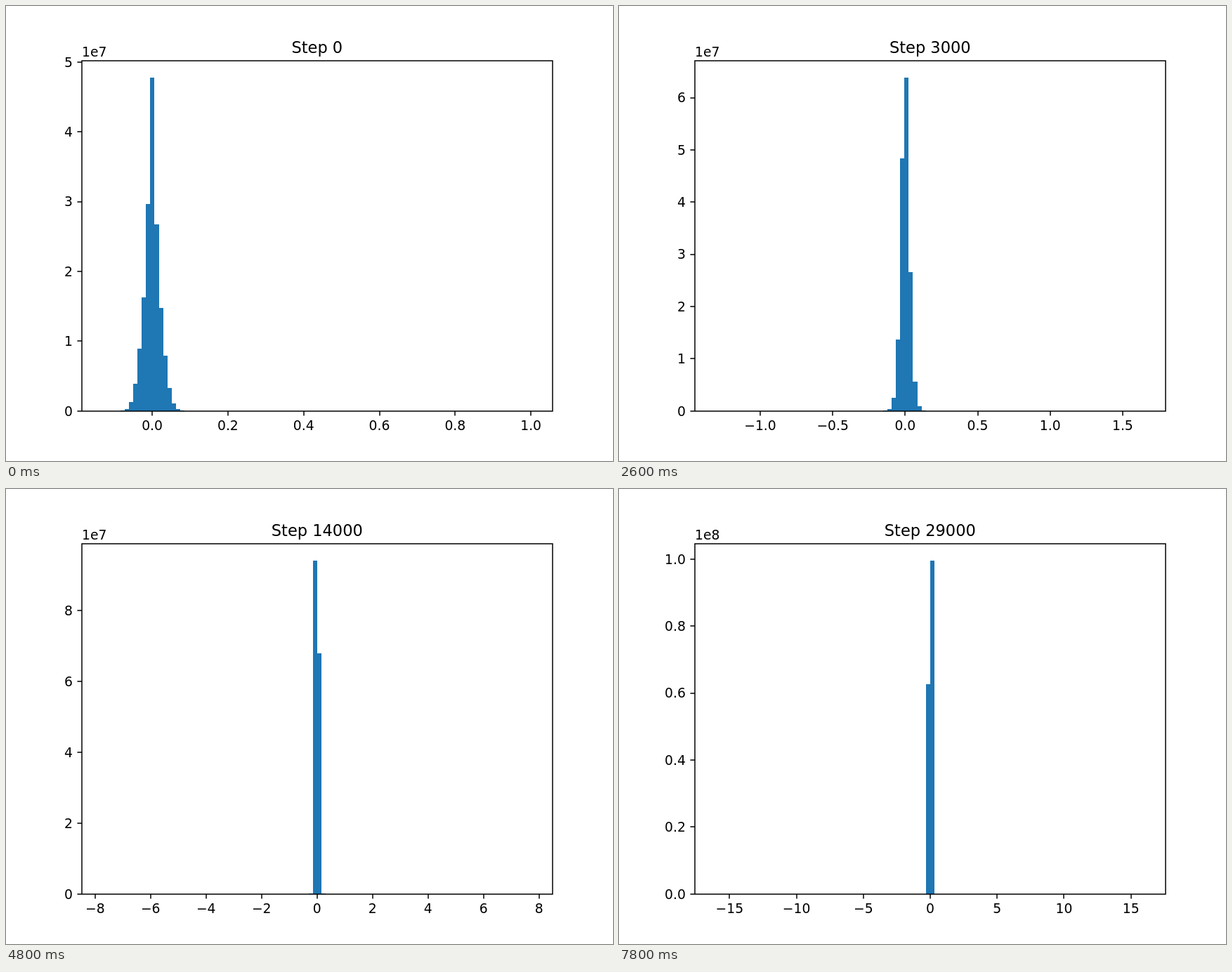
An HTML page for the animation above (8 s loop, 864x648 px).

```html
<!DOCTYPE html>
<html lang="en">
<head>
<meta charset="utf-8">
<title>Histogram by step</title>
<style>
html, body { margin: 0; width: 100%; height: 100%; overflow: hidden; background: #fff; }
svg { display: block; width: 864px; height: 648px; }
text { font: 18.75px "DejaVu Sans", sans-serif; fill: #000; }
.title { font-size: 22.5px; }
.mid { text-anchor: middle; }
.end { text-anchor: end; }
.bars { fill: #1f77b4; }
.axes { fill: none; stroke: #000; stroke-width: 1.5; }
</style>
</head>
<body>
<svg id="plot" viewBox="0 0 864 648"></svg>
<script>
const FRAME_MS = 200, FRAMES = 40, BINS = 100;
const LEFT = 108, RIGHT = 777.6, TOP = 77.76, BOTTOM = 576.72;
const DATA_X = LEFT + (RIGHT - LEFT) / 22, DATA_W = (RIGHT - LEFT) / 1.1;
const BAR_MAX = (BOTTOM - TOP) / 1.05;
const TOTAL = 16.22; // in units of 1e7

// Logistic curves of the cumulative share, with a spike at zero and thin tails
const EARLY = { slope: 65, shift: .02, cubic: 7400, spike: .4 };
const MIDDLE = { slope: 59.4, shift: -.1, cubic: 250, spike: 0 };
const LATE = { slope: 50, shift: .19, cubic: 0, spike: 0 };

const svg = document.getElementById('plot');
const lerp = (a, b, t) => a + (b - a) * t;
const unit = t => Math.min(1, Math.max(0, t));
const snapY = y => 648 - Math.floor(648.5 - y);
const text = (x, y, cls, s) => `<text x="${x}" y="${y}" class="${cls}">${s}</text>`;

// Doubles up to 512, then counts in thousands
function stepAt(i) {
  return i === 0 ? 0 : i < 11 ? 2 ** (i - 1) : 1000 * (i - 10);
}

function rangeAt(i) {
  const step = stepAt(i), u = i - 17;
  if (u < 0) {
    const growth = unit(step / 3000) ** 2.5, spread = unit((i - 13) / 4);
    const min = lerp(-.1292, -1.303, growth);
    const max = 1 + .0018 * unit(step / 64) ** 2 + .645 * growth;
    return { min: lerp(min, -3.652, spread), max: lerp(max, 3.652, spread) };
  }
  const half = 3.652 + .588 * u - .00125 * u * u;
  const mid = .0043 * unit(u / 5) - .0174 * unit((u - 5) / 10) ** 1.5;
  return { min: mid - half, max: mid + half };
}

function curveAt(i) {
  const [a, b, t] = i < 13
    ? [EARLY, MIDDLE, unit((i - 7) / 6) ** 2]
    : [MIDDLE, LATE, unit((i - 13) / 4)];
  const mix = name => lerp(a[name], b[name], t);
  const slope = mix('slope'), shift = mix('shift'), cubic = mix('cubic'), spike = mix('spike');
  return x => TOTAL / (1 + Math.exp(
    -(shift + slope * x + cubic * x ** 3 + spike * Math.tanh(x / .00808))));
}

function histogram(i, { min, max }) {
  const below = curveAt(i), edge = k => lerp(min, max, k / BINS);
  return Array.from({ length: BINS }, (_, k) => below(edge(k + 1)) - below(edge(k)));
}

function ticks(lo, hi) {
  const raw = (hi - lo) / 9, mag = 10 ** Math.floor(Math.log10(raw));
  const step = mag * [1, 2, 2.5, 5, 10].find(s => s * mag >= raw - 1e-9);
  const values = [];
  for (let k = Math.ceil(lo / step - 1e-9); k * step <= hi; k++) values.push(k * step);
  return { step, values };
}

function label(v, step) {
  const whole = d => Math.abs(step * 10 ** d - Math.round(step * 10 ** d)) < 1e-6;
  return (v < -1e-9 ? '\u2212' : '') + Math.abs(v).toFixed([0, 1, 2].find(whole));
}

function draw(i) {
  const range = rangeAt(i), span = range.max - range.min;
  const counts = histogram(i, range), peak = Math.max(...counts);
  let bars = '', lines = '', labels = '';

  counts.forEach((n, k) => {
    const x0 = Math.round(DATA_X + DATA_W * k / BINS);
    const x1 = Math.round(DATA_X + DATA_W * (k + 1) / BINS);
    const y = snapY(BOTTOM - BAR_MAX * n / peak);
    if (y < 577) bars += `M${x0} 577V${y}H${x1}V577z`;
  });

  const xs = ticks(range.min - span / 20, range.max + span / 20);
  for (const v of xs.values) {
    const x = DATA_X + DATA_W * (v - range.min) / span;
    lines += `M${Math.round(x)} 577v6.56`;
    labels += text(x, 604, 'mid', label(v, xs.step));
  }

  const ys = ticks(0, peak * 1.05);
  const scale = ys.values.at(-1) > 10 - 1e-9 ? 10 : 1;
  for (const v of ys.values) {
    const y = BOTTOM - BAR_MAX * v / peak;
    lines += `M108 ${snapY(y)}h-6.56`;
    labels += text(94.9, Math.round(y + 6.84), 'end', label(v / scale, ys.step / scale));
  }

  svg.innerHTML = `<path class="bars" d="${bars}"/>` +
    `<path class="axes" d="${lines}M108 78H778V577H108z"/>` + labels +
    text(108, 72, '', scale === 10 ? '1e8' : '1e7') +
    text(442.8, 67, 'title mid', 'Step ' + stepAt(i));
}

let shown = -1;
const start = performance.now();
function tick(now) {
  const i = Math.floor(Math.max(0, now - start) / FRAME_MS) % FRAMES;
  if (i !== shown) draw(shown = i);
  requestAnimationFrame(tick);
}
tick(start);
</script>
</body>
</html>
```
